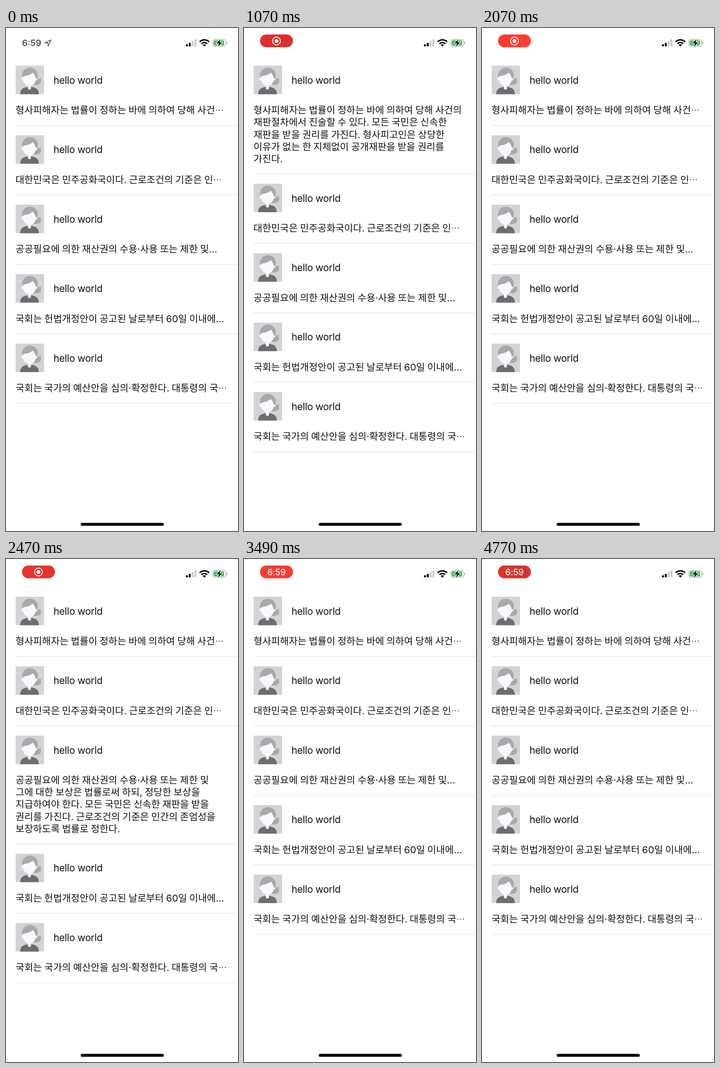
Recreate the animation shown at these times as an HTML page with a canvas. Size 500 px wide and 1082 px high, loop 4.87 s.

```html
<!DOCTYPE html>
<html lang="ko">
<head>
<meta charset="utf-8">
<title>Expanding list</title>
<style>
html, body { margin: 0; width: 100%; height: 100%; overflow: hidden; background: #fff; }
canvas { display: block; width: 500px; height: 1082px; }
</style>
</head>
<body>
<canvas id="stage"></canvas>
<script>
const W = 500, H = 1082, LOOP = 4870;
const LINE = 26.07, ROW = 149.45;
const SANS = 'Inter, "Noto Sans CJK KR", "Noto Sans CJK JP", sans-serif';

const canvas = document.getElementById('stage');
const ctx = canvas.getContext('2d');
const dpr = window.devicePixelRatio || 1;
canvas.width = W * dpr;
canvas.height = H * dpr;

// Each row: short text, full text, and the times it opens and closes.
const rows = [
  { short: '형사피해자는 법률이 정하는 바에 의하여 당해 사건⋯', open: 770, close: 1170, lines: [
    '형사피해자는 법률이 정하는 바에 의하여 당해 사건의',
    '재판절차에서 진술할 수 있다. 모든 국민은 신속한',
    '재판을 받을 권리를 가진다. 형사피고인은 상당한',
    '이유가 없는 한 지체없이 공개재판을 받을 권리를',
    '가진다.'] },
  { short: '대한민국은 민주공화국이다. 근로조건의 기준은 인⋯', open: 1490, close: 1970, lines: [
    '대한민국은 민주공화국이다. 근로조건의 기준은',
    '인간의 존엄성을 보장하도록 법률로 정한다.',
    '공공필요에 의한 재산권의 수용·사용 또는 제한 및',
    '그에 대한 보상은 법률로써 하되, 정당한 보상을',
    '지급하여야 한다'] },
  { short: '공공필요에 의한 재산권의 수용·사용 또는 제한 및...', open: 2270, close: 2670, lines: [
    '공공필요에 의한 재산권의 수용·사용 또는 제한 및',
    '그에 대한 보상은 법률로써 하되, 정당한 보상을',
    '지급하여야 한다. 모든 국민은 신속한 재판을 받을',
    '권리를 가진다. 근로조건의 기준은 인간의 존엄성을',
    '보장하도록 법률로 정한다.'] },
  { short: '국회는 헌법개정안이 공고된 날로부터 60일 이내에...', open: 3070, close: 3470, lines: [
    '국회는 헌법개정안이 공고된 날로부터 60일 이내에',
    '의결하여야 하며, 국회의 의결은 재적의원 3분의 2',
    '이상의 찬성을 얻어야 한다.'] },
  { short: '국회는 국가의 예산안을 심의·확정한다. 대통령의 국⋯', open: 3770, close: 4370, lines: [
    '국회는 국가의 예산안을 심의·확정한다. 대통령의',
    '국법상 행위는 문서로써 하며, 이 문서에는 국무총리와',
    '관계 국무위원이 부서한다. 군사에 관한 것도 또한',
    '같다. 제3항의 승인을 얻지 못한 때에는 그 처분 또는',
    '명령은 그때부터 효력을 상실한다. 이 경우 그 명령에',
    '의하여 개정 또는 폐지되었던 법률은 그 명령이 승인을',
    '얻지 못한 때부터 당연히 효력을 회복한다.'] }
];

const clamp = v => Math.max(0, Math.min(1, v));
const ramp = (t, from, to) => clamp((t - from) / (to - from));
const smooth = v => v * v * (3 - 2 * v);

function fillPath(d, color) {
  ctx.fillStyle = color;
  ctx.fill(new Path2D(d));
}

function box(x, y, w, h, r, color) {
  ctx.fillStyle = color;
  ctx.beginPath();
  ctx.roundRect(x, y, w, h, r);
  ctx.fill();
}

function oval(x, y, rx, ry, color) {
  ctx.fillStyle = color;
  ctx.beginPath();
  ctx.ellipse(x, y, rx, ry, 0, 0, Math.PI * 2);
  ctx.fill();
}

function label(str, x, y, size, { weight = 400, color = '#111', track = 0, gap = 0, align = 'left' } = {}) {
  ctx.font = `${weight} ${size}px ${SANS}`;
  ctx.letterSpacing = track + 'px';
  ctx.wordSpacing = gap + 'px';
  ctx.textAlign = align;
  ctx.fillStyle = color;
  ctx.fillText(str, x, y);
}

// Body text; a trailing ⋯ is drawn as three raised dots.
function body(str, y) {
  const raised = str.endsWith('⋯');
  const text = raised ? str.slice(0, -1) : str;
  label(text, 20.5, y, 20.7, { gap: -0.8 });
  if (!raised) return;
  const end = 20.5 + ctx.measureText(text).width;
  for (let i = 0; i < 3; i++) oval(end + 3.4 + i * 6.1, y - 7.6, 1.1, 1.1, '#111');
}

function avatar(y) {
  const hair = '#a8a9ac', skin = '#f9f9fb';
  ctx.save();
  ctx.translate(20.5, y);
  ctx.beginPath();
  ctx.rect(0, 0, 61.5, 61.5);
  ctx.clip();
  box(0, 0, 61.5, 61.5, 0, '#d2d3d5');
  fillPath('M41 29 Q48 27 56 27 Q53 30 55.5 33 C55 40 47 43 39 41 Z', hair);
  oval(31, 21, 17, 16.5, hair);
  fillPath('M10 62 C10 51 15 48 25 46 L36 46 C46 48 50 52 50.5 62 Z', '#6c6d70');
  box(26.7, 38, 6.6, 13.5, 3.3, skin);
  oval(15.5, 28.5, 2.6, 3.4, skin);
  oval(44.5, 28.5, 2.6, 3.4, skin);
  oval(30, 28, 14, 15.5, skin);
  fillPath('M14.5 25 C13 11 23 3 33 4.5 C44 6 50 15 47.5 25 Q46 29 44 28 C43 23 40 18 37 15 C31 21 23 21.5 17.5 22.5 Q16 24 14.5 25 Z', hair);
  ctx.restore();
}

function list(t) {
  let y = 81;
  for (const row of rows) {
    const lines = t >= row.open && t < row.close ? row.lines : [row.short];
    avatar(y);
    label('hello world', 102.5, y + 38.8, 21, { track: -0.3 });
    lines.forEach((s, i) => body(s, y + 103.4 + i * LINE));
    y += ROW + (lines.length - 1) * LINE;
    box(20.5, y - 21.6, W - 20.5, 1.2, 0, '#e4e4e5');
  }
}

function clock(alpha) {
  if (alpha <= 0) return;
  ctx.globalAlpha = alpha;
  label('6:59', 34.5, 38.7, 18.8, { weight: 600, color: '#515153' });
  ctx.strokeStyle = '#515153';
  ctx.lineWidth = 1.6;
  ctx.lineJoin = 'round';
  ctx.stroke(new Path2D('M97 25.8 L83.8 32 L90.4 32.4 L90.9 39 Z'));
  ctx.globalAlpha = 1;
}

function pill(t) {
  const inn = ramp(t, 200, 300);
  if (inn <= 0) return;
  const pop = ramp(t, 200, 560);
  const scale = pop < 0.45 ? 0.6 + 0.58 * smooth(pop / 0.45) : 1.18 - 0.18 * smooth((pop - 0.45) / 0.55);
  const dark = smooth(0.5 + 0.5 * Math.cos((t - 1000) / 1860 * Math.PI * 2));
  const mix = (a, b) => Math.round(a + (b - a) * dark);
  const color = `rgb(${mix(255, 217)},${mix(59, 50)},${mix(48, 45)})`;
  const swap = ramp(t, 3200, 3400);

  ctx.save();
  ctx.translate(70, 27.7);
  ctx.scale(scale, scale);
  ctx.globalAlpha = inn;
  box(-35.5, -13.7, 71, 27.4, 13.7, color);

  ctx.globalAlpha = inn * (1 - swap);
  ctx.strokeStyle = '#fff';
  ctx.lineWidth = 1.8;
  ctx.beginPath();
  ctx.arc(0, 0.2, 8.4, 0, Math.PI * 2);
  ctx.stroke();
  oval(0, 0.2, 4, 4, '#fff');

  ctx.globalAlpha = inn * swap;
  label('6:59', 0, 6.9, 18.6, { weight: 500, color: '#fff', track: -0.2, align: 'center' });
  ctx.restore();
}

function statusIcons() {
  [4.5, 7.5, 11.3, 15].forEach((h, i) =>
    box(387.8 + i * 6.1, 39.4 - h, 4.2, h, 1.2, i < 2 ? '#000' : '#cbcbcd'));

  // Wi-Fi
  ctx.save();
  ctx.beginPath();
  ctx.moveTo(427.5, 40);
  ctx.arc(427.5, 40, 17, -Math.PI * 0.75, -Math.PI * 0.25);
  ctx.closePath();
  ctx.clip();
  oval(427.5, 40, 5, 5, '#000');
  ctx.strokeStyle = '#000';
  ctx.lineWidth = 3;
  for (const r of [8.8, 14.4]) {
    ctx.beginPath();
    ctx.arc(427.5, 40, r, 0, Math.PI * 2);
    ctx.stroke();
  }
  ctx.restore();

  // Battery
  ctx.strokeStyle = '#a6a6a8';
  ctx.lineWidth = 1.2;
  ctx.beginPath();
  ctx.roundRect(445.6, 24.6, 28, 14.8, 4.6);
  ctx.stroke();
  box(447.6, 26.6, 22.5, 10.8, 2.8, '#35c759');
  box(474.8, 29.6, 1.7, 4.8, 1, '#a6a6a8');
  const bolt = new Path2D('M462.6 23.8 L453.6 33 L459 33 L456.8 40.4 L465.8 30.8 L460.2 30.8 Z');
  ctx.strokeStyle = '#fff';
  ctx.lineWidth = 2.6;
  ctx.stroke(bolt);
  ctx.fillStyle = '#000';
  ctx.fill(bolt);
}

function draw(t) {
  ctx.setTransform(dpr, 0, 0, dpr, 0, 0);
  box(0, 0, W, H, 0, '#fff');
  list(t);
  clock(1 - ramp(t, 100, 260));
  pill(t);
  statusIcons();
  box(161, 1064.6, 179, 6.2, 3.1, '#000');
}

const start = performance.now();
function tick() {
  draw((performance.now() - start) % LOOP);
  requestAnimationFrame(tick);
}
tick();
</script>
</body>
</html>
```
